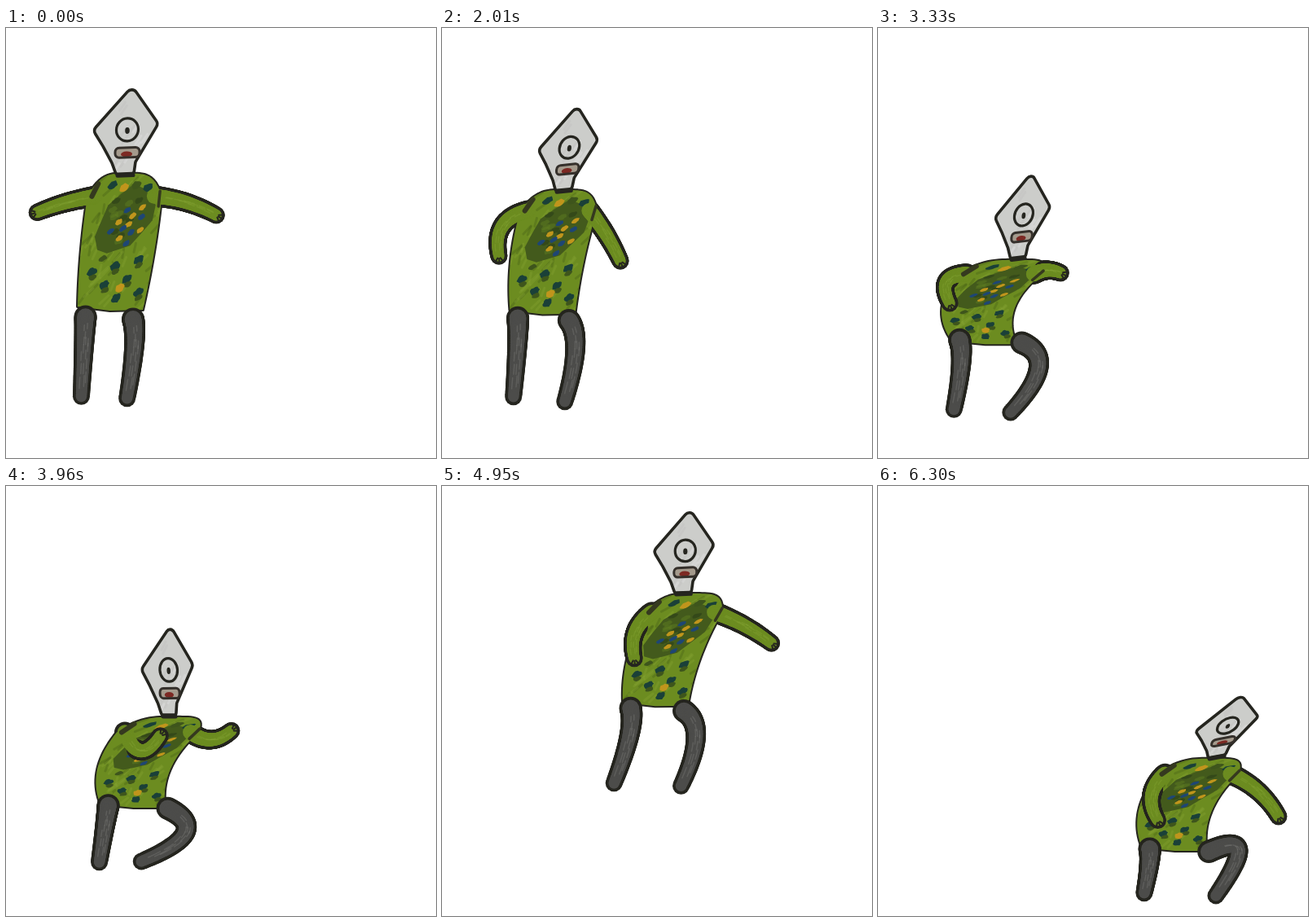
Recreate the animation shown at these times as an HTML page with a canvas. Size 528 by 528 pixels, loop 6.33 s.

```html
<!DOCTYPE html>
<html>
<head>
<meta charset="utf-8">
<style>
html, body { margin: 0; width: 100%; height: 100%; overflow: hidden; background: #fff; }
canvas { display: block; }
</style>
</head>
<body>
<canvas id="stage" width="528" height="528"></canvas>
<script>
const g = document.getElementById('stage').getContext('2d');
const LOOP = 6330, STEP = 30, INK = '#25251f', GREEN = '#6c8c20', TALL = 157;

// head: neck offset, width, lean, height; limbs: upper angle, lower angle, reach
// ease: exponent of the move that leads into the pose
const poses = [
  { time: 0, ease: 1, hip: [128, 344], chest: [148, 188], head: [-2, 1, 0, 1],
    armL: [168, 161, .92], armR: [11, 23, 1], legL: [93, 93, 1], legR: [88, 98, 1] },
  { time: 1230, ease: 1.5, hip: [125, 345], chest: [149, 190], head: [-2, .92, .06, .96],
    armL: [131, 84, 1], armR: [79, 71, 1.08], legL: [94, 93, 1], legR: [84, 99, 1.04] },
  { time: 2700, ease: 2.4, hip: [118, 362], chest: [146, 270], head: [12, .87, .15, .93],
    armL: [213, 141, .62], armR: [-33, 29, .3], legL: [81, 99, .96], legR: [57, 110, 1.04] },
  { time: 3960, ease: 1.6, hip: [156, 393], chest: [199, 290], head: [1, .8, -.05, 1.02],
    armL: [49, -38, .75], armR: [20, -24, .68], legL: [99, 99, .72], legR: [55, 147, 1.03] },
  { time: 4950, ease: 1, hip: [262, 411], chest: [305, 283], head: [-9, .93, 0, .95],
    armL: [130, 92, .8], armR: [24, 33, 1], legL: [93, 108, .97], legR: [66, 107, 1] },
  { time: 5700, ease: 1, hip: [339, 364], chest: [366, 253], head: [11, .95, .19, .71],
    armL: [130, 134, .83], armR: [75, 81, .92], legL: [88, 86, .95], legR: [50, 89, .98] },
  { time: 6300, ease: .65, hip: [364, 446], chest: [405, 341], head: [11, .95, .2, .69],
    armL: [122, 76, .78], armR: [32, 51, 1], legL: [92, 100, .56], legR: [-3, 116, 1] }
];

const rnd = n => { const s = Math.sin(n * 12.9898) * 43758.5453; return s - Math.floor(s); };
const mix = (a, b, k) => a.map((x, i) => x + (b[i] - x) * k);
const polar = ([x, y], deg, r) => [x + r * Math.cos(deg * Math.PI / 180), y + r * Math.sin(deg * Math.PI / 180)];

// height of a parabolic arc between two times: a crouch, then the jump
function arc(t, from, to, height) {
  const k = (t - from) / (to - from);
  return k > 0 && k < 1 ? 4 * height * k * (1 - k) : 0;
}

function poseAt(t) {
  const i = Math.max(1, poses.findIndex(p => p.time >= t));
  const a = poses[i - 1], b = poses[i];
  const k = ((t - a.time) / (b.time - a.time)) ** b.ease;
  const pose = {};
  for (const part in a) if (Array.isArray(a[part])) pose[part] = mix(a[part], b[part], k);
  const lift = arc(t, 3960, 5700, 146) - arc(t, 2700, 3960, 14);
  pose.hip[1] -= lift;
  pose.chest[1] -= lift;
  return pose;
}

function trace(points, closed) {
  g.beginPath();
  points.forEach(p => g.lineTo(...p));
  if (closed) g.closePath();
}

function stroke(color, width) {
  g.strokeStyle = color;
  g.lineWidth = width;
  g.stroke();
}

function fill(color) {
  g.fillStyle = color;
  g.fill();
}

// maps shirt coordinates (0..1) to the stage; a shorter torso bows backwards
function shirtMap({ hip, chest }, squash) {
  const mid = mix(chest, hip, .5), wide = 45 + squash * .15;
  return (u, v) => {
    const s = 2 * u - 1;
    const top = [chest[0] + s * wide, chest[1]];
    const waist = [mid[0] - squash * .4 + s * 45.5, mid[1]];
    const hem = [hip[0] + s * 40, hip[1] + s * 2];
    return top.map((y, n) => y * (1 - v) * (1 - 2 * v) + waist[n] * 4 * v * (1 - v) + hem[n] * v * (2 * v - 1));
  };
}

function shirtEdge(at) {
  const edge = [];
  for (let i = 0; i <= 20; i++) edge.push(at(0, 1 - i * .044));
  for (let i = 0; i <= 30; i++) edge.push(at(i / 30, -.06 + .18 * (i / 15 - 1) ** 4));
  for (let i = 0; i <= 20; i++) edge.push(at(1, .12 + i * .044));
  edge.push(at(.5, 1.02));
  return edge;
}

function drawShirt(at, edge) {
  const blob = (u, v, ru, rv, seed, color, lean = -.02) => {
    trace(Array.from({ length: 14 }, (_, i) => {
      const a = i * Math.PI / 7, r = .85 + .3 * rnd(seed + i);
      return at(u + Math.cos(a) * ru * r + lean * Math.sin(a), v + Math.sin(a) * rv * r);
    }), true);
    fill(color);
  };
  const teal = '#1a4038', yellow = '#c0951c', blue = '#1e4674', moss = '#3e551c';

  trace(edge, true);
  fill(GREEN);
  g.save();
  g.clip();
  for (let i = 0; i < 70; i++) {
    const u = rnd(i), v = rnd(i + 200);
    trace([at(u, v), at(u + rnd(i + 400) * .14, v - .07)]);
    stroke(i % 2 ? 'rgba(70,95,22,.35)' : 'rgba(135,165,55,.3)', 3);
  }
  blob(.56, .31, .33, .26, 31, '#435a1c', -.13);
  for (let i = 0; i < 12; i++)
    blob(.36 + rnd(i + 60) * .42, .12 + rnd(i + 80) * .38, .05, .025, i, i % 2 ? 'rgba(95,125,32,.5)' : 'rgba(38,56,22,.5)');
  for (let i = 0; i < 12; i++) {
    const a = i * 2.4, r = Math.sqrt(i / 12) * .25;
    blob(.6 + r * Math.cos(a) - r * .3 * Math.sin(a), .34 + r * .65 * Math.sin(a), .042, .026, i + 40, i % 2 ? blue : yellow);
  }
  for (let i = 0; i < 4; i++)
    blob(.32 + i * .16, .03 + i % 2 * .02, .06, .033, i + 90, i === 1 ? yellow : i === 2 ? moss : teal);
  for (let i = 0; i < 7; i++) {
    const u = (.86 + i * .618) % 1, v = .62 + i * .05;
    blob(.1 + u * .82, v, .064, .037, i + 120, teal);
    blob(.1 + (u + .4) % 1 * .82, v - .01, .05, .025, i + 150, moss);
  }
  blob(.6, .84, .06, .033, 170, yellow);
  g.restore();
}

function makeLimb(root, [upper, lower, reach], lengths, radii) {
  const joint = polar(root, upper, lengths[0] * reach);
  const tip = polar(joint, lower, lengths[1] * reach);
  const bend = mix(mix(root, tip, .5), joint, 2);
  return Array.from({ length: 61 }, (_, i) => {
    const k = i / 60;
    return { p: mix(mix(root, bend, k), mix(bend, tip, k), k), r: radii[0] + (radii[1] - radii[0]) * k };
  });
}

function paintLimb(limb, color, from = 0, inset = 0) {
  for (const { p, r } of limb.slice(from)) {
    g.beginPath();
    g.arc(...p, r - inset, 0, 7);
    fill(color);
  }
}

function drawLimb(limb, color, light, inkFrom) {
  paintLimb(limb, INK, inkFrom);
  paintLimb(limb, color, 0, 3.7);
  for (let i = 0; i < 16; i++) {
    const n = 3 + Math.floor(rnd(i + 9) * 48), dx = (rnd(i + 30) - .5) * 10;
    trace([0, 3, 6].map(j => [limb[n + j].p[0] + dx, limb[n + j].p[1]]));
    stroke(light, 1.5);
  }
}

function drawFingers(arm) {
  const [x, y] = arm[60].p, [px, py] = arm[54].p;
  const deg = Math.atan2(y - py, x - px) * 180 / Math.PI;
  for (const turn of [-30, 5, 40]) {
    trace([polar([x, y], deg + turn, 3), polar([x, y], deg + turn, 8)]);
    stroke(INK, 2);
  }
}

function drawHead([neck, width, lean, height], chest) {
  const kite = [[-39, -55], [9, -107], [41, -60], [13, -14], [11, 0], [-11, 0], [-16, -14]];
  // paths are built in head space, lines keep an even width
  const shape = build => {
    g.setTransform(width, -.04 - .7 * lean, -lean, height, chest[0] + neck, chest[1] - 9);
    g.beginPath();
    build();
    g.resetTransform();
  };
  const outline = () => {
    g.moveTo(-27, -35);
    kite.forEach((p, i) => g.arcTo(...p, ...kite[(i + 1) % 7], i < 3 ? 7 : 3));
    g.closePath();
  };
  const line = (x, y, dx, dy) => shape(() => { g.moveTo(x, y); g.lineTo(x + dx, y + dy); });
  const oval = (x, y, rx, ry) => shape(() => g.ellipse(x, y, rx, ry, 0, 0, 7));
  const mouth = () => g.roundRect(-12, -32, 30, 12, 5);

  shape(outline);
  fill('#cccdca');
  g.save();
  g.clip();
  for (let i = 0; i < 26; i++) {
    line(rnd(i + 5) * 80 - 40, -rnd(i + 70) * 100, 7, -10);
    stroke(i % 2 ? 'rgba(225,226,224,.4)' : 'rgba(185,187,184,.3)', 3);
  }
  g.restore();
  shape(outline);
  stroke(INK, 3.6);
  line(-9, 2, 19, 0);
  stroke(INK, 5);
  oval(3, -54, 13.5, 14);
  stroke(INK, 3.2);
  oval(3, -53, 2.8, 4);
  fill(INK);
  shape(mouth);
  fill('#a49a8c');
  oval(2, -24, 7, 3.5);
  fill('#7c2923');
  shape(mouth);
  stroke('#35302b', 3);
}

function draw(t) {
  const pose = poseAt(t), { hip, chest } = pose;
  const squash = Math.max(0, TALL - Math.hypot(chest[0] - hip[0], chest[1] - hip[1]));
  const at = shirtMap(pose, squash), edge = shirtEdge(at);
  const arms = [
    makeLimb(at(.1, .12), pose.armL, [40, 40], [13, 10.5]),
    makeLimb(at(.9, .12), pose.armR, [40, 40], [13, 10.5])
  ];
  const legs = [['legL', .12], ['legR', .85 + squash * .004]].map(([name, u]) => {
    const [x, y] = at(u, 1);
    return makeLimb([x, y + 12 - squash * .25], pose[name], [36, 62], [14, 10.5]);
  });

  g.fillStyle = '#fff';
  g.fillRect(0, 0, 528, 528);
  arms.forEach(arm => paintLimb(arm, INK));
  trace(edge, true);
  stroke(INK, 4);
  drawShirt(at, edge);
  legs.forEach(leg => drawLimb(leg, '#4c4c4a', 'rgba(135,135,132,.3)', 0));
  arms.forEach(arm => {
    drawLimb(arm, GREEN, 'rgba(135,165,55,.35)', 22);
    drawFingers(arm);
  });
  trace([at(.12, .02), at(.06, .12)]);
  stroke('#35391f', 6);
  trace([at(.97, .08), at(.97, .2)]);
  stroke('#35391f', 3.5);
  drawHead(pose.head, chest);
}

g.lineJoin = g.lineCap = 'round';
const start = performance.now();
function tick() {
  const t = Math.floor((performance.now() - start) % LOOP / STEP) * STEP;
  draw(t < 2 * STEP ? 0 : t);
  requestAnimationFrame(tick);
}
tick();
</script>
</body>
</html>
```
